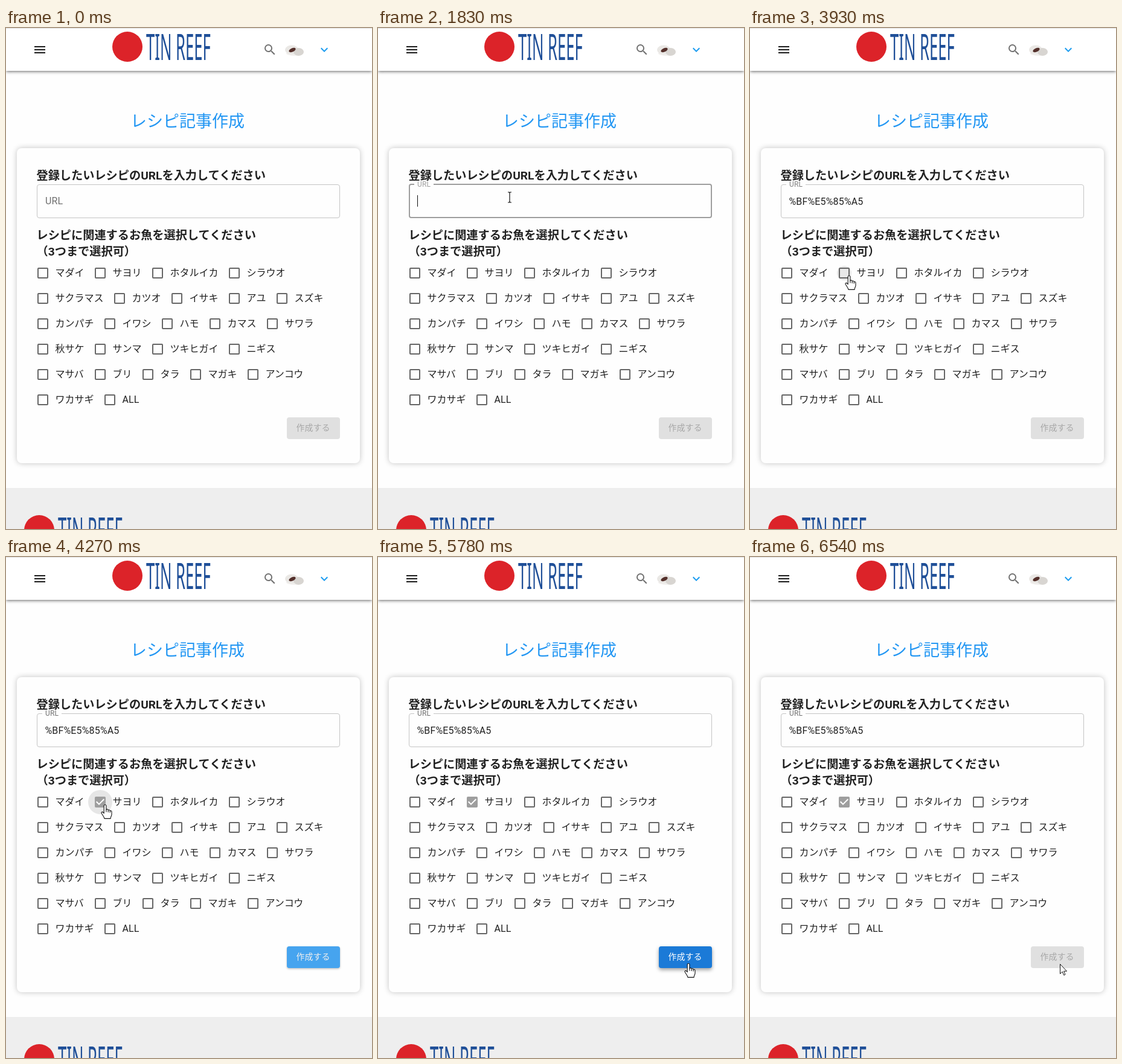
An HTML page for the animation above (8000 ms loop, 606 by 830 pixels).

```html
<!DOCTYPE html>
<html lang="ja">
<head>
<meta charset="utf-8">
<title>レシピ記事作成</title>
<style>
  html, body { margin: 0; width: 606px; height: 830px; overflow: hidden; background: #fefefe; }
  body { position: relative; }
  div, svg { position: absolute; box-sizing: border-box; }
  #bar { left: 0; top: 0; width: 606px; height: 71px; background: #fff; border-top: 1px solid #e0e0e0;
    box-shadow: 0 2px 4px -1px rgba(0,0,0,.36), 0 2px 5px rgba(0,0,0,.18), 0 1px 8px rgba(0,0,0,.12); }
  #card { left: 18px; top: 199px; width: 568px; height: 522px; border-radius: 8px; background: #fefefe;
    box-shadow: 0 0 10px rgba(0,0,0,.24); }
  #foot { left: 0; top: 762px; width: 606px; height: 68px; background: #eee; }
  #field { left: 51px; bottom: 515px; width: 502px; height: 56px; border: 1px solid #c4c4c4; border-radius: 4px; }
  #button { left: 465px; top: 645px; width: 88px; height: 36px; border-radius: 4px; overflow: hidden; }
  #wave { left: -6px; top: -21px; width: 100px; height: 100px; border-radius: 50%; background: #fff; }
  svg { left: 0; top: 0; }
  text { font-family: Roboto, 'Noto Sans CJK JP', sans-serif; font-size: 16px; fill: #212121; white-space: pre; }
  .jp { font-weight: 350; }
  .title { font-size: 27px; font-weight: 300; fill: #2196f3; }
  .head { font-size: 19.2px; font-weight: 700; }
  .latin { letter-spacing: .15px; }
  .logo { font: 400 61px 'Noto Sans', sans-serif; fill: #1f4f98; }
  #action { font-size: 14px; }
</style>
</head>
<body>
<div id="bar"></div>
<div id="card"></div>
<div id="foot"></div>
<div id="field"></div>
<div id="button"><div id="wave"></div></div>

<svg width="606" height="830" viewBox="0 0 606 830">
  <defs>
    <g id="brand">
      <circle cx="201" cy="31" r="25" fill="#dc2329"/>
      <text class="logo" transform="translate(232 53) scale(.42 1)">TIN REEF</text>
    </g>
  </defs>
  <use href="#brand"/>
  <use href="#brand" x="-146" y="801"/>

  <path transform="translate(44 24)" fill="#1c1c1c" d="M3 18h18v-2H3zM3 13h18v-2H3zM3 8h18V6H3z"/>
  <path transform="translate(425 24)" fill="#717171" d="M15.5 14h-.79l-.28-.27A6.47 6.47 0 0 0 16 9.5 6.5 6.5 0 1 0 9.5 16c1.61 0 3.09-.59 4.23-1.57l.27.28v.79l5 4.99L20.49 19zm-6 0a4.5 4.5 0 1 1 0-9 4.5 4.5 0 0 1 0 9z"/>
  <path transform="translate(515 24)" fill="#1b9cf0" d="M16.59 8.59 12 13.17 7.41 8.59 6 10l6 6 6-6z"/>
  <g>
    <ellipse cx="478" cy="42" rx="14" ry="4" fill="#f1efed"/>
    <ellipse cx="473" cy="36" rx="11" ry="7.5" fill="#eae8e5"/>
    <ellipse cx="484.500" cy="39.500" rx="8.500" ry="6.500" fill="#d8d5d1"/>
    <ellipse cx="474" cy="36.500" rx="6" ry="3" fill="#54302b" transform="rotate(-24 474 36.5)"/>
  </g>

  <text class="title" x="206" y="163.500">レシピ記事作成</text>
  <text class="head" x="50.500" y="250.500">登録したいレシピのURLを入力してください</text>
  <text class="head" x="50.500" y="349.500">レシピに関連するお魚を選択してください</text>
  <text class="head" x="50.500" y="376.500">（3つまで選択可）</text>

  <rect id="notch" x="-16" y="257" width="32" height="5" fill="#fefefe"/>
  <text id="label" class="latin">URL</text>
  <text id="value" class="latin" x="64.500" y="293">%BF%E5%85%A5</text>
  <rect id="caret" y="277" width="1" height="19" fill="#111"/>

  <circle id="ripple" r="20" fill="#000"/>
  <g id="boxes"></g>
  <g id="tick" transform="translate(144 394)">
    <rect x="3" y="3" width="18" height="18" rx="2" fill="#9e9e9e"/>
    <path d="M5.700 11.300 10 15.600 18.300 7.300" fill="none" stroke="#fff" stroke-width="2"/>
  </g>
  <text id="action" class="jp" x="480.500" y="667">作成する</text>

  <g id="mouse" stroke-linejoin="round">
    <path id="arrow" fill="#fff" stroke="#111" d="M.5.5V16.500L4.200 13l2.500 5.800 2.300-1L6.500 12.200h5z"/>
    <g id="beam" fill="none">
      <path stroke="#fff" stroke-width="3" d="M-3-8h2L0-7 1-8h2M0-7V8M-3 9h2L0 8 1 9h2"/>
      <path stroke="#111" stroke-width="1.200" d="M-3-8h2L0-7 1-8h2M0-7V8M-3 9h2L0 8 1 9h2"/>
    </g>
    <g id="hand" stroke="#111" stroke-width="1.100">
      <path fill="#fff" d="M-1.800 2C-1.800 0 1.900 0 1.900 2V8.500C3 7.500 5 7.800 5.200 9.300 6.400 8.600 8 9 8.200 10.400 9.600 9.900 11 10.600 11 12.200V16.500C11 19 9 20 9 23.400H-1C-1.500 20.500-4 18-5.800 14.600-6.800 12.600-4.300 11.600-2.900 13.400L-1.800 14.600z"/>
      <path fill="none" d="M1.900 8.500v4M5.200 9.300v3.600M8.200 10.400v3"/>
    </g>
  </g>
</svg>

<script>
const LOOP = 8000;
const HOLD = 'steps(1, end)';
const EASE = 'cubic-bezier(.4, 0, .2, 1)';
const OUT = 'cubic-bezier(0, 0, .2, 1)';
const get = id => document.getElementById(id);

function add(parent, name, attrs, content = '') {
  const el = document.createElementNS('http://www.w3.org/2000/svg', name);
  for (const key in attrs) el.setAttribute(key, attrs[key]);
  el.textContent = content;
  parent.append(el);
}

// Each step is [time, style, easing towards the next step].
function play(id, steps) {
  const last = steps[steps.length - 1];
  const frames = [...steps, [LOOP, last[1]]].map(([time, style, easing = HOLD]) =>
    ({ ...style, offset: time / LOOP, easing }));
  get(id).animate(frames, { duration: LOOP, iterations: Infinity });
}

const show = (id, steps) => play(id, steps.map(([time, opacity]) => [time, { opacity }]));
const move = (x, y, scale = 1) => ({ transform: `translate(${x}px, ${y}px) scale(${scale})` });

const rows = [
  'マダイ サヨリ ホタルイカ シラウオ',
  'サクラマス カツオ イサキ アユ スズキ',
  'カンパチ イワシ ハモ カマス サワラ',
  '秋サケ サンマ ツキヒガイ ニギス',
  'マサバ ブリ タラ マガキ アンコウ',
  'ワカサギ ALL'
];
rows.forEach((row, i) => {
  let x = 61;
  const y = 406 + 42 * i;
  for (const name of row.split(' ')) {
    const checked = name === 'サヨリ';
    add(get('boxes'), 'rect', { x: x - 8, y: y - 8, width: 16, height: 16, rx: 1,
      fill: 'none', stroke: '#666', 'stroke-width': 2, ...(checked && { id: 'empty' }) });
    add(get('boxes'), 'text', { x: x + 20.5, y: y + 5, class: name === 'ALL' ? 'latin' : 'jp' }, name);
    x += name.length * 16 + 47;
  }
});

// Text field
const border = (borderColor, borderWidth = '1px', height = '56px') => ({ borderColor, borderWidth, height });
play('field', [
  [0, border('#c4c4c4')],
  [860, border('#212121')],
  [1630, border('#9e9e9e', '2px', '57px')],
  [3870, border('#c4c4c4')]
]);
play('label', [
  [0, { ...move(65, 292), fill: '#707070' }],
  [1630, { ...move(65, 292), fill: '#707070' }, OUT],
  [1830, { ...move(65, 263, .75), fill: '#9e9e9e' }],
  [3870, { ...move(65, 263, .75), fill: '#9e9e9e' }, OUT],
  [4070, { ...move(65, 263, .75), fill: '#707070' }]
]);
const notch = s => ({ transform: `translate(76px, 0) scale(${s}, 1)` });
play('notch', [[0, notch(0)], [1680, notch(0), OUT], [1780, notch(1)]]);
show('value', [[0, 0], [2430, 1]]);
const caret = (x, opacity) => ({ ...move(x, 0), opacity });
play('caret', [
  [0, caret(65, 0)], [1630, caret(65, 1)], [2160, caret(65, 0)],
  [2430, caret(186, 1)], [2960, caret(186, 0)], [3500, caret(186, 1)], [3870, caret(186, 0)]
]);

// Checkbox
show('tick', [[0, 0], [4130, 1]]);
show('empty', [[0, 1], [4130, 0]]);
const ripple = (scale, opacity) => ({ ...move(156, 406, scale), opacity });
play('ripple', [
  [0, ripple(1, 0)], [3200, ripple(1, .015)],
  [3870, ripple(.1, .06), OUT], [4130, ripple(1, .11)],
  [4250, ripple(1, .1), 'linear'], [4480, ripple(1, .015)], [4820, ripple(1, 0)]
]);

// Button
const face = (backgroundColor, y, blur, alpha) =>
  ({ backgroundColor, boxShadow: `0 ${y}px ${blur}px rgba(0, 0, 0, ${alpha})` });
const off = face('#e0e0e0', 0, 0, 0);
const on = face('#2196f3', 2, 4, .3);
const hover = face('#1b7ad7', 3, 6, .38);
play('button', [
  [0, off], [4140, off, EASE], [4390, on], [5520, on, EASE], [5770, hover],
  [6270, hover, EASE], [6520, off]
]);
const dim = { fill: '#a8a8a8' }, lit = { fill: '#fff' };
play('action', [[0, dim], [4140, dim, EASE], [4390, lit], [6270, lit, EASE], [6520, dim]]);
const wave = (s, opacity) => ({ transform: `scale(${s})`, opacity });
play('wave', [
  [0, wave(.05, 0)], [5980, wave(.05, .25), OUT], [6200, wave(1, .25), 'linear'], [6450, wave(1, 0)]
]);

// Pointer
const path = [
  [0, 379, 728], [260, 379, 728], [550, 233, 427], [750, 233, 427], [820, 226, 345],
  [890, 215, 283], [960, 213, 269], [1050, 214, 262], [1200, 217, 272], [1360, 218, 280],
  [2920, 218, 280], [3030, 208, 312], [3100, 190, 350], [3170, 172, 385], [3240, 163.5, 398],
  [3530, 164, 410], [4780, 164, 410], [5100, 458, 565], [5320, 458, 565], [5430, 475, 600],
  [5500, 495, 640], [5570, 508, 662], [5640, 514, 673], [6260, 514, 673], [6270, 513, 674]
];
play('mouse', path.map(([time, x, y]) => [time, move(x, y), 'linear']));
const shapes = [
  [0, ''], [260, 'arrow'], [390, 'hand'], [800, 'arrow'], [860, 'beam'], [3040, 'arrow'],
  [3165, 'hand'], [4850, 'arrow'], [5040, 'hand'], [5410, 'arrow'], [5510, 'hand'], [6270, 'arrow']
];
for (const id of ['arrow', 'hand', 'beam'])
  show(id, shapes.map(([time, shape]) => [time, +(shape === id)]));
</script>
</body>
</html>
```
